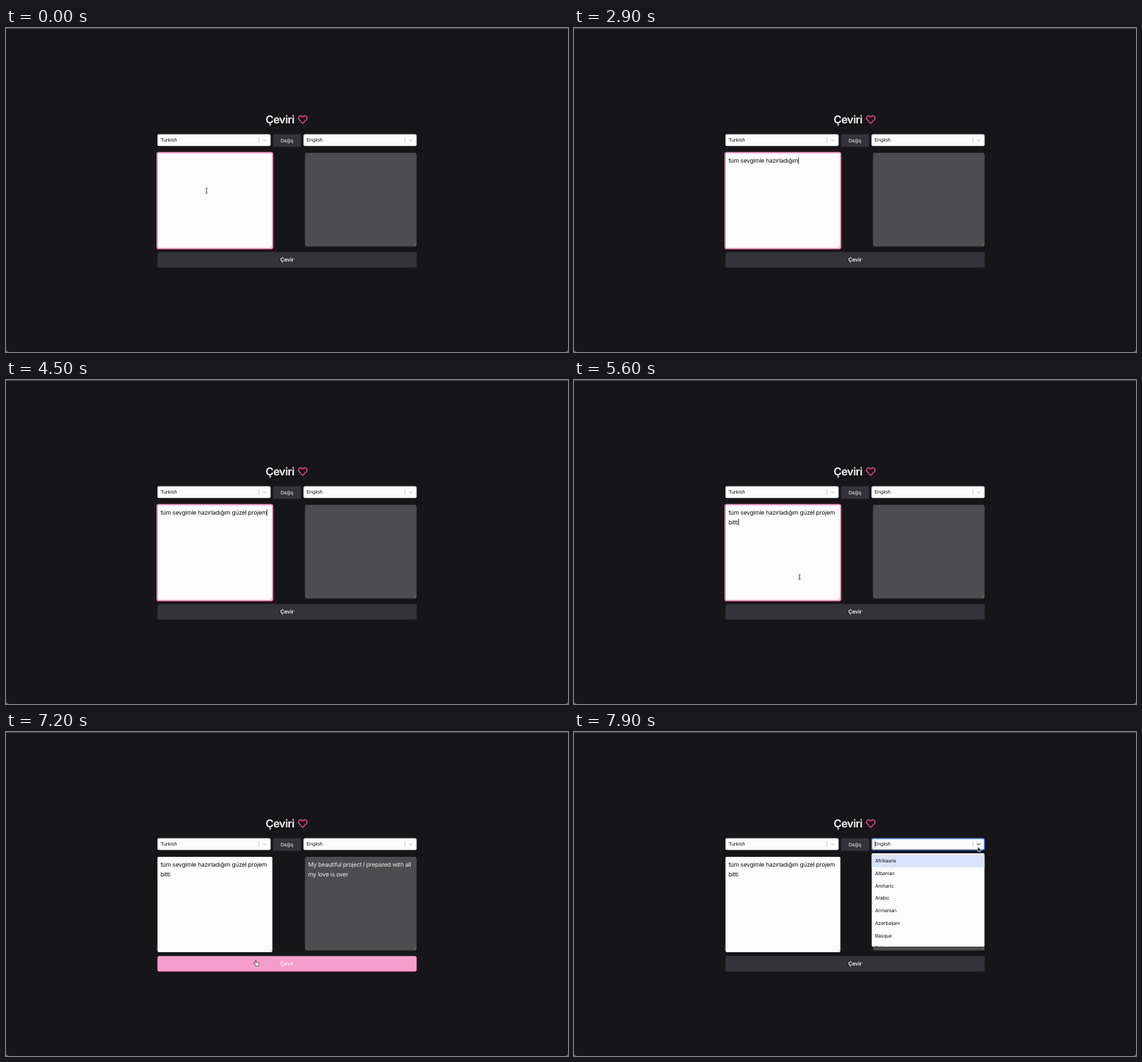
Write an HTML page that moves like this. It is 800 px wide and 462 px high and loops after 8 s.

```html
<!DOCTYPE html>
<html lang="tr">
<head>
<meta charset="utf-8">
<style>
  html, body { margin: 0; height: 100%; overflow: hidden; background: #161618; }
  svg { display: block; width: 100vw; height: 100vh; }
  text { font: 6.9px Inter, Roboto, sans-serif; letter-spacing: -.1px; fill: #111; white-space: pre; text-rendering: geometricPrecision; }
  .area { font-size: 8.5px; letter-spacing: -.2px; }
  .title { font-size: 15.5px; font-weight: 600; letter-spacing: -.5px; fill: #fafafa; }
  .label { fill: #f4f4f5; text-anchor: middle; }
  .strong { font-size: 7.7px; font-weight: 600; letter-spacing: -.15px; }
  .line { fill: none; stroke-width: 1; }
</style>
</head>
<body>
<svg viewBox="0 0 800 462">
  <defs>
    <g id="select">
      <rect width="161" height="16.7" rx="2" fill="#fcfcfc"/>
      <path class="line" d="M144.5 4v9" stroke="#ccc" stroke-width=".6"/>
    </g>
    <path id="chevron" class="line" d="M-2.6-1.3 0 1.3 2.6-1.3"/>
    <path id="grip" class="line" d="M-4.2-1 -1-4.2M-2-1 -1-2" stroke="#999" style="stroke-width:.5"/>
    <clipPath id="menuClip"><rect x="423.5" y="173" width="161" height="133" rx="2"/></clipPath>
  </defs>

  <rect width="800" height="462" fill="#58585a"/>
  <path d="M0 1H800V457a5 5 0 0 1-5 5H5a5 5 0 0 1-5-5z" fill="#161618"/>

  <text class="title" x="369.5" y="136.3">Çeviri</text>
  <path transform="translate(415.3 123.4) scale(.595)" fill="none" stroke="#df4489" stroke-width="2.5" stroke-linejoin="round"
    d="M20.8 4.6a5.5 5.5 0 0 0-7.8 0L12 5.7l-1-1.1a5.5 5.5 0 0 0-7.8 7.8L12 21.2l8.8-8.8a5.5 5.5 0 0 0 0-7.8z"/>

  <use href="#select" x="215.6" y="151.5"/>
  <use href="#chevron" x="368" y="160" stroke="#c4c4c8"/>
  <text x="220.2" y="162.3">Turkish</text>

  <rect x="380.3" y="151.5" width="39.7" height="18" rx="2.2" fill="#343339"/>
  <text class="label" x="400" y="163">Değiş</text>

  <use href="#select" x="423.5" y="151.5"/>
  <use id="openArrow" href="#chevron" x="576" y="160" stroke="#c4c4c8"/>
  <text x="428" y="162.3">English</text>

  <rect x="215.6" y="178" width="163.6" height="136" rx="2" fill="#fcfcfc"/>
  <rect id="ring" class="line" x="215" y="177.6" width="164.6" height="137" rx="2.4" stroke="#f08fb4" style="stroke-width:1.6"/>
  <use href="#grip" x="379" y="314"/>
  <text id="line1" class="area" x="220" y="192.2"></text>
  <text id="line2" class="area" x="220" y="205.6"></text>
  <rect id="caret" width=".7" height="10" fill="#111"/>

  <rect x="425.6" y="178" width="158.9" height="133.4" rx="2" fill="#4d4d4f"/>
  <use href="#grip" x="584.2" y="311.2"/>
  <g id="result">
    <text class="area" x="430" y="192.2" style="fill:#ececec">My beautiful project I prepared with all</text>
    <text class="area" x="430" y="205.6" style="fill:#ececec">my love is over</text>
  </g>

  <rect x="215.6" y="319.6" width="368.9" height="22" rx="2.4" fill="#343339"/>
  <rect id="hover" x="215.6" y="319.6" width="368.9" height="22" rx="2.4" fill="#f59dcc"/>
  <text class="label strong" x="400" y="333.4">Çevir</text>

  <g id="menu">
    <rect class="line" x="423.7" y="151.8" width="160.6" height="16.3" rx="2" stroke="#2459d3" style="stroke-width:1.3"/>
    <path class="line" d="M428.4 155v9.5" stroke="#222" style="stroke-width:.6"/>
    <g clip-path="url(#menuClip)">
      <rect x="423.5" y="173" width="161" height="133" fill="#fcfcfc"/>
      <rect x="423.5" y="175" width="161" height="17.8" fill="#d7e4fb"/>
      <g id="options"></g>
    </g>
  </g>

  <g id="beam" class="line" stroke="#333" style="stroke-width:.8">
    <path d="M-1.6-3.6Q0-3.6 0-2.6Q0-3.6 1.6-3.6M0-2.6V2.6M-1.6 3.6Q0 3.6 0 2.6Q0 3.6 1.6 3.6M-.8.8H.8"/>
  </g>
  <path id="arrow" d="M-1-4V3L.6 1.6 1.7 4 2.9 3.4 1.9 1.2H4z" fill="#111" stroke="#fff" stroke-width=".6"/>
  <path id="hand" d="M-1.6-4.2q.9-.5 1.2.5v2.1q2.8 0 3.7 1.2 .5 2.3-.8 4.4H-.9Q-2-.1-3.2.5q-.6-.9.3-1.2l1.2.7v-3.5z"
    fill="#fff" stroke="#222" stroke-width=".7" stroke-linejoin="round"/>
</svg>
<script>
const LOOP = 8000, STEP = 100, FIRST_LINE = 38;
const el = id => document.getElementById(id);
const clamp = v => Math.min(1, Math.max(0, v));
const show = (id, on) => el(id).style.display = on ? '' : 'none';

// Bursts of typing: first key, last key, characters.
const bursts = [
  [100, 900, 'tüm sev'], [1100, 1600, 'gimle'], [1800, 2600, ' hazırladığ'],
  [2800, 2900, 'ım'], [3000, 3600, ' güzel'], [3800, 3800, ' p'],
  [4000, 4000, 'ro'], [4200, 4500, 'jem'], [4600, 4800, ' bi'], [5000, 5200, 'tti'],
];

// Pointer waypoints: time, x, y.
const moves = [[5400, 285.5, 232], [5800, 356.5, 329.8], [7200, 356.5, 329.8], [7600, 576.3, 168.3], [7800, 575.7, 167.6]];

el('options').innerHTML = ['Afrikaans', 'Albanian', 'Amharic', 'Arabic', 'Armenian', 'Azerbaijani', 'Basque', 'Belarusian']
  .map((name, i) => `<text x="428.7" y="${186.2 + 17.75 * i}">${name}</text>`).join('');

function typedAt(t) {
  return bursts.map(([start, end, chars]) => {
    if (t < start) return '';
    const gap = (end - start) / (chars.length - 1);
    return gap ? chars.slice(0, Math.floor((t - start) / gap + 1e-6) + 1) : chars;
  }).join('');
}

function pointerAt(t) {
  let [, x, y] = moves[0];
  for (let i = 1; i < moves.length; i++) {
    const [t0, x0, y0] = moves[i - 1], [t1, x1, y1] = moves[i];
    if (t < t0) break;
    const p = clamp((t - t0) / (t1 - t0)), eased = p * p * (3 - 2 * p);
    x = x0 + (x1 - x0) * eased;
    y = y0 + (y1 - y0) * eased;
  }
  return [x, y];
}

function draw(t) {
  const typed = typedAt(t), focused = t < 6000, open = t >= 7800;
  const wrapped = typed.length > FIRST_LINE + 1;
  el('line1').textContent = typed.slice(0, FIRST_LINE);
  el('line2').textContent = typed.slice(FIRST_LINE + 1);
  const line = el(wrapped ? 'line2' : 'line1');
  el('caret').setAttribute('x', 220 + (typed ? line.getComputedTextLength() : 0));
  el('caret').setAttribute('y', wrapped ? 197.6 : 184.2);
  show('caret', focused && typed);
  show('ring', focused);
  show('result', t >= 6200 && !open);
  show('menu', open);
  el('openArrow').setAttribute('stroke', open ? '#222' : '#c4c4c8');

  const [x, y] = pointerAt(t);
  const overButton = y > 319.6, overInput = x < 379 && y > 178 && y < 314;
  const shape = overButton ? 'hand' : overInput ? 'beam' : 'arrow';
  for (const id of ['hand', 'beam', 'arrow']) {
    show(id, id === shape && (t < 100 || t >= 5400));
    el(id).setAttribute('transform', `translate(${x} ${y})`);
  }
  el('hover').setAttribute('opacity', clamp((t - 5650) / 150) * clamp((7450 - t) / 150));
}

function tick() {
  const t = performance.now() % LOOP;
  draw(Math.floor(t / STEP) * STEP);
  requestAnimationFrame(tick);
}
tick();
</script>
</body>
</html>
```
